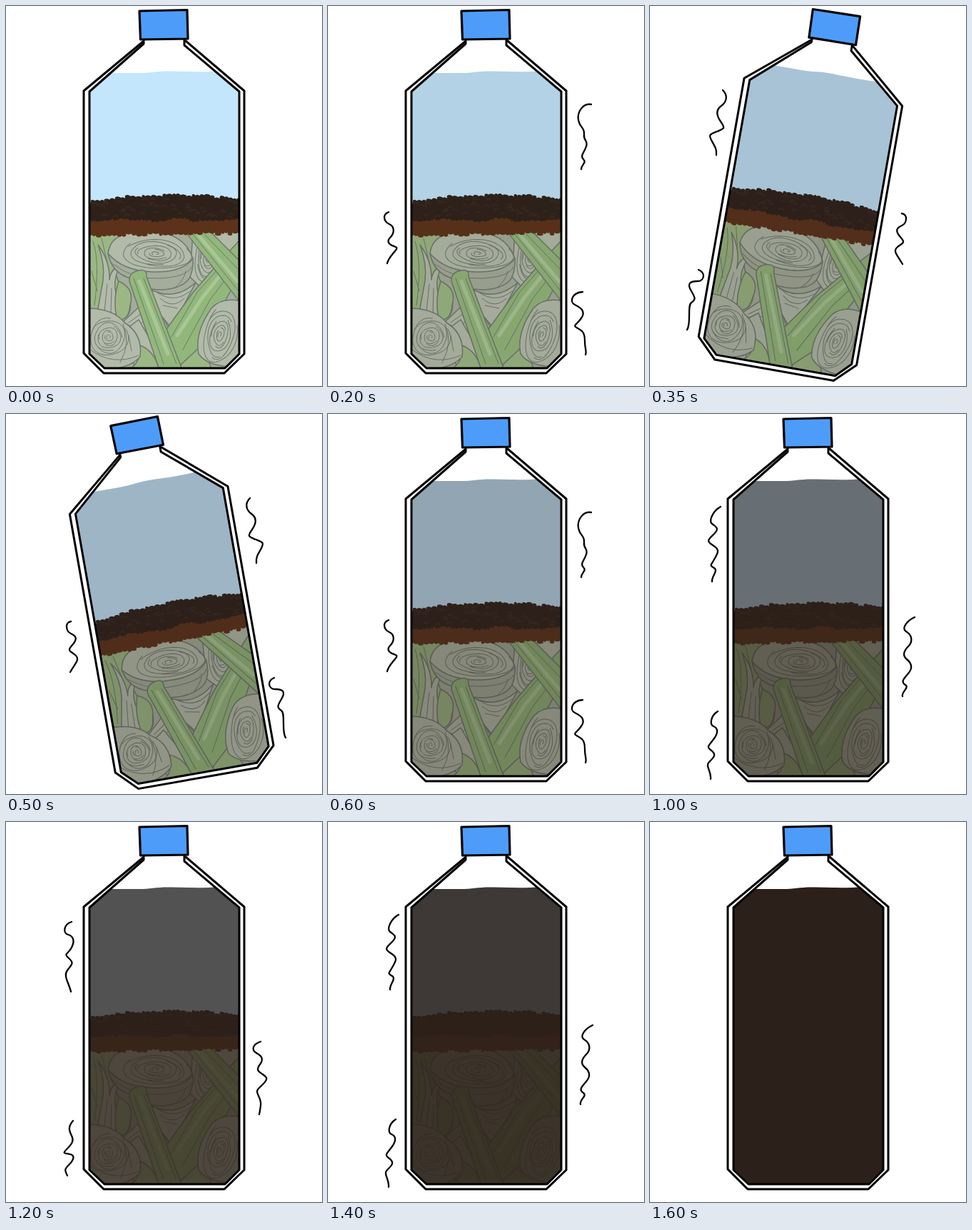
Write an HTML page that moves like this. It is 443 px wide and 533 px high and loops after 1800 ms.

```html
<!DOCTYPE html>
<html lang="en">
<head>
<meta charset="utf-8">
<title>Compost bottle</title>
<style>
  html, body { margin: 0; width: 100%; height: 100%; overflow: hidden; background: #fff; }
  svg { display: block; width: 100vw; height: 100vh; }
  path { stroke-linejoin: round; stroke-linecap: round; }
  .wall, .marks { fill: none; stroke: #000; stroke-width: 3; }
  .marks { stroke-width: 2.3; visibility: hidden; }
  .veg path { stroke: #6f786f; stroke-width: 1.5; }
  .veg .line { fill: none; stroke-width: 1; }
  .pale { fill: #b2bba9; }
  .shade { fill: #a4ad9b; }
  .leaf { fill: #9bb883; }
  .stalk { fill: #92b77b; }
  .veg .shine { fill: none; stroke: #a9c796; stroke-width: 5; }
</style>
</head>
<body>
<svg viewBox="0 0 443 533">
  <defs>
    <clipPath id="inside"><path d="M194 55L117 120V488L138 508H307L327 488V120L250 55Z"/></clipPath>
    <path id="fill" d="M140 94H185C205 94 210 91 232 91.500S275 93 300 91L340 110V520H100V110Z"/>
  </defs>

  <g id="bottle">
    <g clip-path="url(#inside)">
      <use href="#fill" fill="#c3e6fd"/>
      <g class="veg">
        <path class="shade" d="M110 312H335V515H110Z"/>
        <path class="leaf" d="M112 312H165L150 358Q156 395 174 408Q178 437 160 440L136 424L112 432Z"/>
        <path class="line" d="M122 330Q132 360 124 420M134 326L142 360M120 372L128 400"/>
        <path class="pale" d="M129 335Q139 362 136 385L129 424Q134 442 152 440Q159 420 153 396Q151 380 161 362Q146 370 145 384Q146 358 129 335Z"/>
        <path class="line" d="M142 390L138 428M148 396L147 432"/>
        <path class="leaf" d="M158 386Q181 396 174 420Q172 442 156 440Q149 414 158 386Z"/>
        <path class="pale" d="M262 316H330V345L300 362L272 394L258 380Z"/>
        <g data-rose="284 352 20 36 8"/>
        <path class="pale" d="M163 444Q184 424 204 406L228 452L206 464Z"/>
        <path class="line" d="M172 444L206 420M180 450L212 432M190 456L218 442"/>
        <path class="pale" d="M200 396Q234 416 266 388L232 452L214 430Z"/>
        <path class="line" d="M212 402Q236 418 258 400M216 410Q234 426 250 410M220 420L240 424"/>
        <path class="shade" d="M143 347Q148 374 174 382Q188 398 218 398Q250 396 258 380Q263 368 262 354Z"/>
        <path class="pale" d="M143 347Q146 322 176 318Q246 308 262 354Q248 374 207 373Q164 372 143 347Z"/>
        <path class="line" d="M150 362Q178 384 216 382T260 366M238 394Q250 384 252 372"/>
        <g data-rose="210 347 49 22 4"/>
        <path class="pale" d="M186 440L224 506H180L170 452Z"/>
        <path class="leaf" d="M188 476Q208 484 214 508H176Q190 496 188 476Z"/>
        <path class="pale" d="M112 424Q150 424 166 444Q192 460 188 492Q176 506 146 510H112Z"/>
        <path class="line" d="M164 446Q176 472 160 500M118 482Q150 506 186 490M172 462L176 484"/>
        <g data-rose="144 464 27 27 0"/>
        <path class="leaf" d="M244 508Q252 482 274 472L288 508Z"/>
        <path class="stalk" d="M330 326L300 358L262 402L223 456L244 504L272 478L330 372Z"/>
        <path class="shine" d="M318 356L276 408L240 462"/>
        <path class="line" d="M310 354L268 402L232 464M324 362L286 412L248 482"/>
        <path class="pale" d="M330 414Q302 408 288 424Q264 458 270 488Q284 508 330 506Z"/>
        <g data-rose="300 461 23 41 12"/>
        <path class="stalk" d="M251 316H286L330 360V418Z"/>
        <path class="shine" d="M270 322L324 386"/>
        <path class="line" d="M262 320L328 402M278 320L328 372"/>
        <path class="stalk" d="M173 386Q172 374 186 371Q198 368 197 380L247 510H215Z"/>
        <path class="shine" d="M187 386L227 488"/>
        <path class="line" d="M179 382L221 502M193 382L239 502"/>
      </g>
      <path id="brown" fill="#5c321a"/>
      <path id="soil" fill="#2e211a"/>
      <path id="clods" fill="none" stroke="#3a2b22" stroke-width="1.500"/>
      <use id="murk" href="#fill" fill="#2c201a"/>
    </g>
    <path class="wall" d="M193 47V53L117 120V488L138 508H307L327 488V120L250 55V47"/>
    <path class="wall" d="M192 50L109 119V487L137 515H306L334 488V119L252 49"/>
    <path d="M187 7L254 5.500L255 46L188.500 47Z" fill="#4e9cfa" stroke="#000" stroke-width="3.200"/>
  </g>

  <g class="marks" id="calm">
    <path d="M369 138C357 136 349 149 351 160S360 170 359 180S365 188 362 197S353 210 358 215S355 222 355 229"/>
    <path d="M85 289C75 293 79 303 86 306S94 318 87 325S89 336 95 338S85 350 83 361"/>
    <path d="M357 401C342 402 338 415 346 419S362 428 355 438S342 448 350 452S360 460 360 470S363 485 361 489"/>
  </g>
  <g class="marks" id="lean">
    <path d="M342 118C334 126 337 135 344 140S352 152 345 162S340 172 350 176S362 180 358 188S350 200 351 209"/>
    <path d="M91 291C82 292 84 305 91 308S101 315 93 324S90 332 97 338S98 348 90 362"/>
    <path d="M376 370C366 374 367 386 378 386S392 390 386 400S380 412 386 416S386 445 392 454"/>
  </g>
  <g class="marks" id="buzz">
    <path d="M99 130C88 136 82 150 87 154S98 160 90 168S78 178 88 184S96 194 90 204S84 212 90 216S86 228 87 235"/>
    <path d="M371 285C360 290 352 301 359 305S370 318 362 326S355 340 360 344S370 355 362 364S352 376 358 380S352 390 354 396"/>
    <path d="M95 417C84 424 84 436 89 438S97 445 90 455S78 466 86 472S89 482 83 488S86 500 85 512"/>
  </g>
  <g class="marks" id="hum">
    <path d="M92 140C80 144 80 156 87 158S97 166 92 176S80 184 88 191S92 200 86 208S88 225 91 238"/>
    <path d="M357 308C345 312 344 320 351 324S362 332 356 340S354 350 360 354S368 360 360 368S350 376 354 384S358 395 355 410"/>
    <path d="M94 419C86 428 89 434 92 440S94 450 86 458S82 464 90 466S94 475 88 481S82 488 86 496"/>
  </g>
</svg>

<script>
  const LOOP = 1800;
  const $ = id => document.getElementById(id);

  let seed = 7;
  const rand = () => (seed = (seed * 16807) % 2147483647) / 2147483647;

  // Crumbly edge from left to right; level(x) gives its mean height.
  function crumble(level, rough) {
    let d = '';
    for (let x = 115; x < 330;) {
      const step = 4 + rand() * 5;
      const y = level(x) + (rand() - 0.5) * rough;
      d += `L${x} ${y}Q${x + step / 2} ${y - rough * 0.6} ${x + step} ${y + rough * 0.1}`;
      x += step;
    }
    return d.slice(1);
  }

  const arch = x => 265 + 8 * ((x - 230) / 105) ** 2;
  const seam = x => 301 + Math.sin(x / 14) * 1.5;
  const foot = x => 321 - (x - 117) / 70;
  $('soil').setAttribute('d', `M${crumble(arch, 4)}V290L332 300L${crumble(x => seam(444 - x), 4)
    .replace(/(-?[\d.]+) (-?[\d.]+)/g, (_, x, y) => `${444 - x} ${y}`)}Z`);
  $('brown').setAttribute('d', `M112 295H332V318L${crumble(x => foot(444 - x) + 1, -4)
    .replace(/(-?[\d.]+) (-?[\d.]+)/g, (_, x, y) => `${444 - x} ${y}`)}Z`);

  let clods = '';
  for (let i = 0; i < 45; i++) {
    const x = 120 + rand() * 200;
    clods += `M${x} ${arch(x) + 4 + rand() * 24}q3 -4 6 0`;
  }
  $('clods').setAttribute('d', clods);

  // Cut cabbage heart: broken, wobbling rings of leaf.
  for (const g of document.querySelectorAll('[data-rose]')) {
    const [cx, cy, rx, ry, turn] = g.dataset.rose.split(' ').map(Number);
    let d = '';
    for (let k = 1; k <= 8; k++) {
      const start = k * 2.3, sweep = 4.2 + rand() * 1.4, phase = rand() * 6;
      for (let i = 0; i <= 24; i++) {
        const a = start + sweep * i / 24;
        const r = k / 8 * (1 + 0.05 * Math.sin(3 * a + phase)) - 0.06 * i / 24;
        d += `${i ? 'L' : 'M'}${(rx * r * Math.cos(a)).toFixed(1)} ${(ry * r * Math.sin(a)).toFixed(1)}`;
      }
    }
    g.setAttribute('transform', `translate(${cx} ${cy}) rotate(${turn})`);
    g.innerHTML = `<path class="line" d="${d}"/>`;
  }

  const murkAt = [[0, 0], [200, 0.1], [500, 0.243], [800, 0.49], [1000, 0.6], [1200, 0.75], [1600, 1], [LOOP, 1]];
  function murkiness(t) {
    const i = murkAt.findIndex(([end]) => t < end);
    const [t0, a] = murkAt[i - 1], [t1, b] = murkAt[i];
    return a + (b - a) * (t - t0) / (t1 - t0);
  }

  const sets = ['calm', 'lean', 'buzz', 'hum'];
  const uprightMarks = { 1: 'hum', 2: 'calm', 6: 'calm', 10: 'buzz', 12: 'hum', 14: 'buzz' };

  function render(t) {
    const beat = Math.floor(t / 100);
    const shaking = beat > 2 && beat < 16 && (beat % 2 === 1 || beat === 4);
    const left = t % 100 < 50;
    const held = shaking && !left ? beat * 100 + 50 : beat * 100;
    const marks = shaking ? 'lean' : uprightMarks[beat];

    $('bottle').setAttribute('transform', shaking ? `rotate(${left ? -10 : 10} 222 242)` : '');
    $('lean').setAttribute('transform', left ? '' : 'translate(444 0) scale(-1 1)');
    $('murk').setAttribute('opacity', murkiness(held));
    for (const id of sets) $(id).style.visibility = id === marks ? 'visible' : 'hidden';
  }

  function tick() {
    render(performance.now() % LOOP);
    requestAnimationFrame(tick);
  }
  tick();
</script>
</body>
</html>
```
